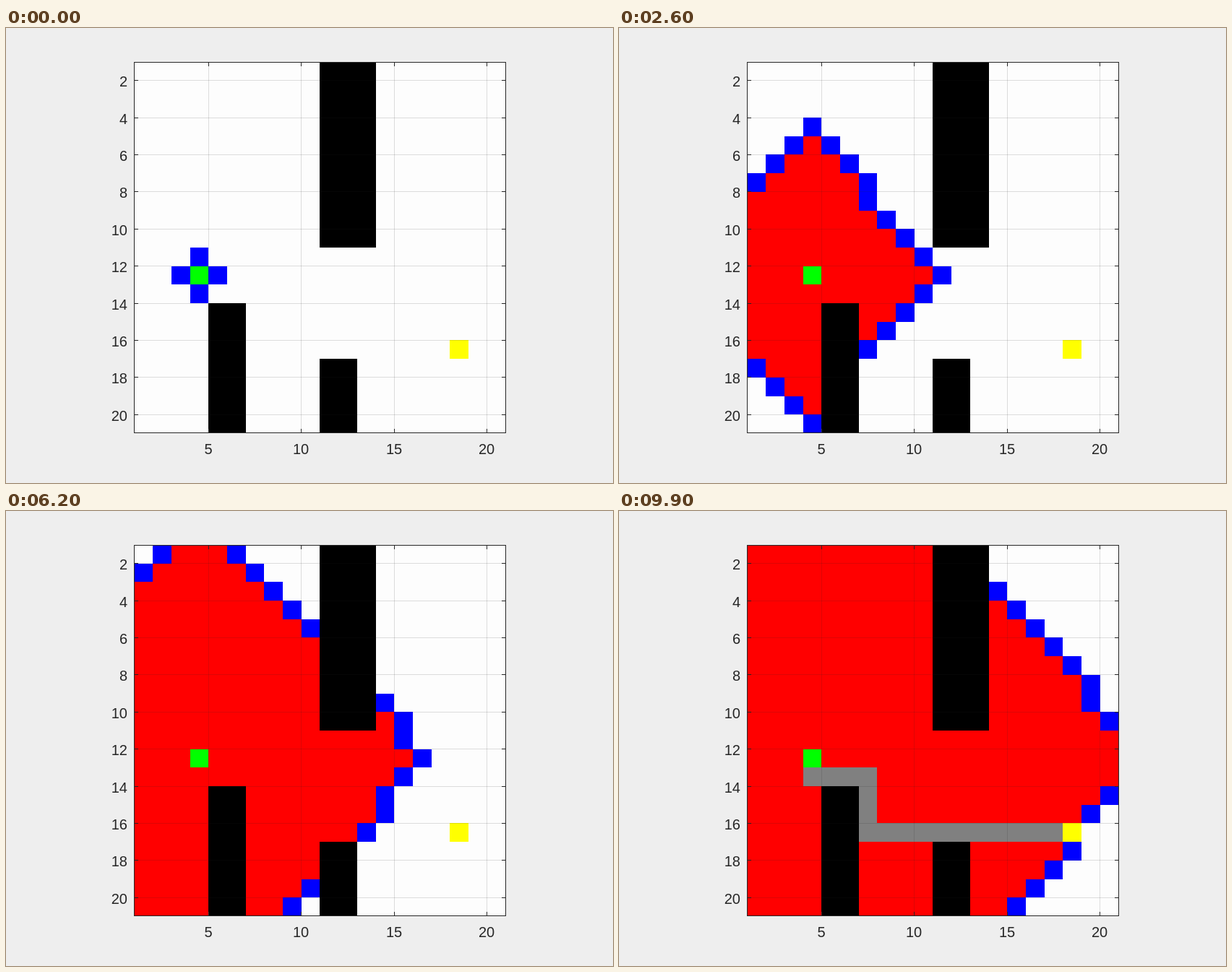
Animation of 840x630 px, one loop 10000 ms. Source, as an HTML page:

```html
<!DOCTYPE html>
<html lang="en">
<head>
<meta charset="utf-8">
<title>Grid search</title>
<style>
  html, body { margin: 0; width: 100%; height: 100%; overflow: hidden; background: #eee; }
  svg { display: block; }
  rect { shape-rendering: crispEdges; }
  text { font: 20px "Liberation Sans", Arial, sans-serif; fill: #262626; }
  .grid { stroke: #262626; stroke-opacity: .15; }
  .axis { stroke: #262626; fill: none; }
</style>
</head>
<body>
<svg id="stage" width="840" height="630" viewBox="0 0 840 630"></svg>
<script>
const N = 20, STEP = 100, FRAMES = 100, DRAWS_PER_FRAME = 3;
const LEFT = 177, TOP = 47, RIGHT = 691, BOTTOM = 560, PITCH = 25.7;
const COLORS = {
  free: '#fdfdfd', wall: '#000', open: '#00f', done: '#f00',
  start: '#0f0', goal: '#ff0', path: '#808080'
};

// Cells are numbered column by column, from 0.
const cell = (row, col) => (col - 1) * N + row - 1;
const START = cell(12, 4), GOAL = cell(16, 18);
const posX = v => 177.4 + PITCH * (v - 1);
const posY = v => 46.95 + PITCH * (v - 1);

const walls = new Set();
function addWall(r1, r2, c1, c2) {
  for (let c = c1; c <= c2; c++)
    for (let r = r1; r <= r2; r++) walls.add(cell(r, c));
}
addWall(1, 10, 11, 13);
addWall(14, 20, 5, 6);
addWall(17, 20, 11, 12);

function neighbours(i) {
  const row = i % N, list = [];
  if (row > 0) list.push(i - 1);
  if (row < N - 1) list.push(i + 1);
  if (i >= N) list.push(i - N);
  if (i < N * (N - 1)) list.push(i + N);
  return list.filter(j => !walls.has(j));
}

// Dijkstra: ties go to the lowest cell number.
function search() {
  const size = N * N;
  const dist = Array(size).fill(Infinity), parent = Array(size).fill(-1);
  const doneAt = Array(size).fill(Infinity), openAt = Array(size).fill(Infinity);
  dist[START] = 0;
  let count = 0;
  while (true) {
    let best = -1;
    for (let i = 0; i < size; i++)
      if (doneAt[i] === Infinity && dist[i] < Infinity && (best < 0 || dist[i] < dist[best])) best = i;
    if (best < 0 || best === GOAL) break;
    doneAt[best] = ++count;
    for (const j of neighbours(best)) {
      if (dist[j] > dist[best] + 1) {
        dist[j] = dist[best] + 1;
        parent[j] = best;
        openAt[j] = count;
      }
    }
  }
  const route = [];
  for (let i = parent[GOAL]; i !== START; i = parent[i]) route.unshift(i);
  const pathAt = Array(size).fill(Infinity);
  route.forEach((i, k) => { pathAt[i] = count + 1 + k; });
  return { doneAt, openAt, pathAt };
}

const { doneAt, openAt, pathAt } = search();

function stateOf(i, draw) {
  if (walls.has(i)) return 'wall';
  if (i === START) return 'start';
  if (i === GOAL) return 'goal';
  if (draw >= pathAt[i]) return 'path';
  if (draw >= doneAt[i]) return 'done';
  return draw >= openAt[i] ? 'open' : 'free';
}

const stage = document.getElementById('stage');
function add(tag, attrs, text) {
  const el = document.createElementNS('http://www.w3.org/2000/svg', tag);
  for (const key in attrs) el.setAttribute(key, attrs[key]);
  if (text !== undefined) el.textContent = text;
  return stage.appendChild(el);
}

const cells = [];
for (let c = 1; c <= N; c++) {
  for (let r = 1; r <= N; r++) {
    const x = Math.round(posX(c)), y = Math.round(posY(r));
    cells.push(add('rect', {
      x, y, width: Math.round(posX(c + 1)) - x, height: Math.round(posY(r + 1)) - y
    }));
  }
}

const line = (cls, d) => add('path', { class: cls, d });
for (let v = 5; v <= 20; v += 5) {
  const x = Math.floor(posX(v)) + .5;
  line('grid', `M${x} ${TOP}V${BOTTOM + 1}`);
  line('axis', `M${x} ${TOP}v6M${x} ${BOTTOM + 1}v-6`);
  add('text', { x: x - .5, y: 590, 'text-anchor': 'middle' }, v);
}
for (let v = 2; v <= 20; v += 2) {
  const y = Math.floor(posY(v)) + .5;
  line('grid', `M${LEFT} ${y}H${RIGHT + 1}`);
  line('axis', `M${LEFT} ${y}h6M${RIGHT + 1} ${y}h-6`);
  add('text', { x: 168, y: y + 8.5, 'text-anchor': 'end' }, v);
}
add('rect', { class: 'axis', x: LEFT + .5, y: TOP + .5, width: RIGHT - LEFT, height: BOTTOM - TOP });

let shown = -1;
function show(now) {
  const frame = Math.floor(now / STEP) % FRAMES;
  if (frame !== shown) {
    shown = frame;
    const draw = 1 + frame * DRAWS_PER_FRAME;
    cells.forEach((el, i) => el.setAttribute('fill', COLORS[stateOf(i, draw)]));
  }
}

show(0);
const begin = performance.now();
function tick() {
  show(performance.now() - begin);
  requestAnimationFrame(tick);
}
requestAnimationFrame(tick);
</script>
</body>
</html>
```
